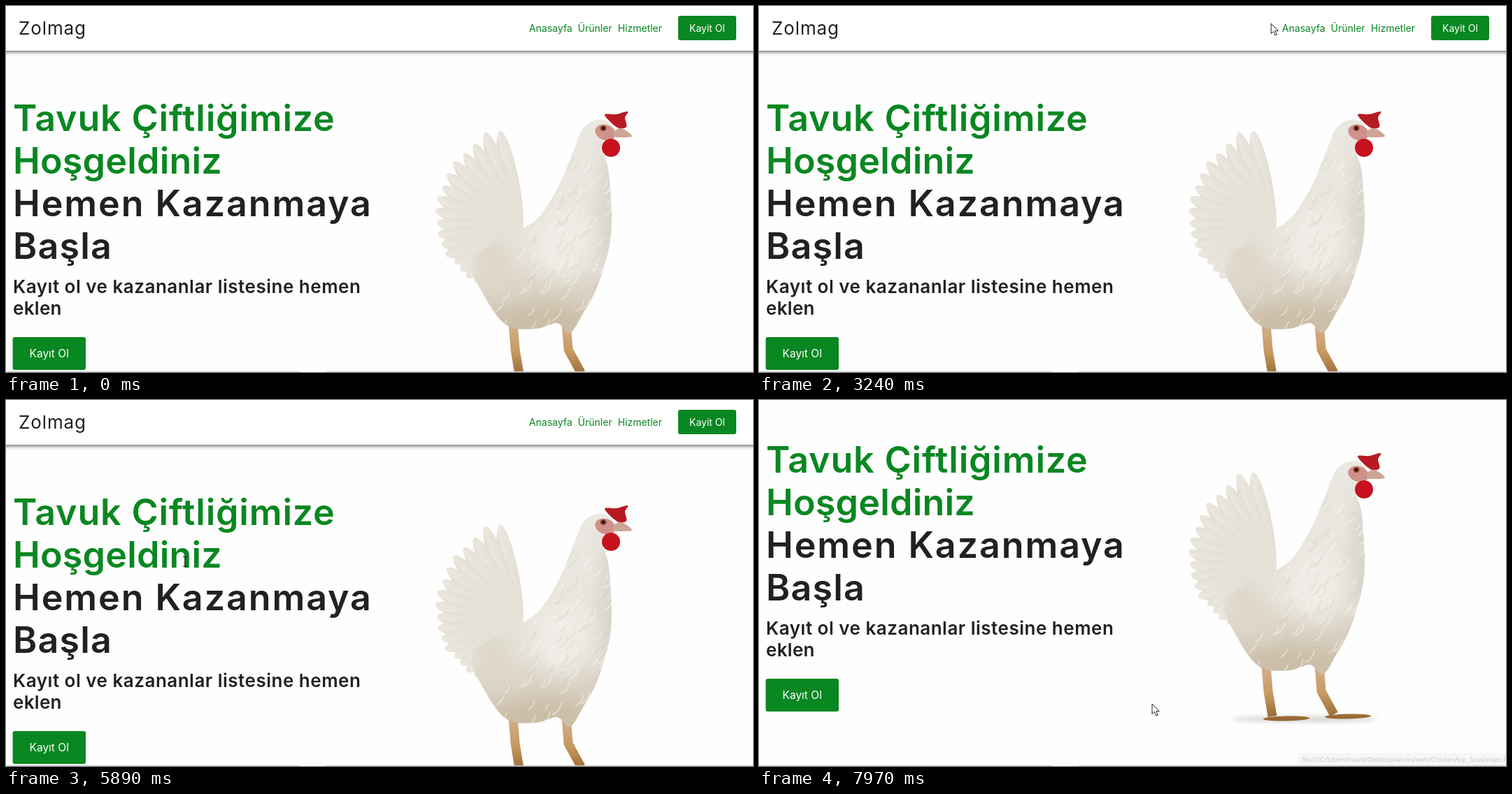
Recreate the animation shown at these times as an HTML page with a canvas. Size 1068 by 524 pixels, loop 8000 ms.

```html
<!DOCTYPE html>
<html lang="tr">
<head>
<meta charset="utf-8">
<title>Tavuk Çiftliği</title>
<style>
html, body { margin: 0; width: 100%; height: 100%; overflow: hidden; background: #fefefe; }
canvas { display: block; }
</style>
</head>
<body>
<canvas id="stage" width="1068" height="524"></canvas>
<script>
const W = 1068, H = 524, LOOP = 8000;
const ctx = document.getElementById('stage').getContext('2d');
const GREEN = [9, 135, 33], BROWN = [160, 82, 45], INK = '#212123';
const SANS = 'Inter, "Open Sans", sans-serif';
const URL_TEXT = 'file:///C:/Users/mavili/Desktop/works/web/ChickenApp_Scss/index.html#';

const mix = (a, b, p) => a + (b - a) * p;
const clamp = p => Math.min(1, Math.max(0, p));
const smooth = p => p * p * (3 - 2 * p);
const tint = p => `rgb(${GREEN.map((c, i) => Math.round(mix(c, BROWN[i], p)))})`;
const ramp = (t, at, time) => smooth(clamp((t - at) / time));
// 0 to 1 from time "on", back to 0 from time "off"
const pulse = (on, off, time = 360) => t => ramp(t, on, time) - ramp(t, off, time);

const logoHover = pulse(1550, 2550);
const headHover = pulse(4760, 5280);
const mainHover = pulse(6900, 7490);
const logoUrl = pulse(1640, 2700, 200);
const navUrl = pulse(3290, 5400, 200);
const mainUrl = pulse(6940, 7840, 200);

const nav = [
  { text: 'Hizmetler', hover: pulse(4240, 4570) },
  { text: 'Ürünler', hover: pulse(3690, 4190) },
  { text: 'Anasayfa', hover: pulse(3250, 3800) }
];

// Each trip of the pointer starts where the last one ended
const trips = [
  { from: 110, to: 840, x: 246, y: 14 },
  { from: 1040, to: 1900, x: 105, y: 34 },
  { from: 2430, to: 3180, x: 732, y: 25 },
  { from: 3240, to: 3920, x: 847, y: 37 },
  { from: 4050, to: 4740, x: 967, y: 28 },
  { from: 5270, to: 5890, x: 256, y: 231 },
  { from: 5890, to: 6850, x: 64, y: 480 },
  { from: 7480, to: 7970, x: 562, y: 435 }
];
function pointerAt(t) {
  let x = 1012, y = 518;
  for (const trip of trips) {
    const p = clamp((t - trip.from) / (trip.to - trip.from));
    x = mix(x, trip.x, p);
    y = mix(y, trip.y, p);
  }
  return [x, y];
}

const title = (text, row, gap) =>
  ({ text, y: 179 + 61 * row, size: 52, gap, color: row < 2 ? tint(0) : INK });
const lead = (text, row, gap) => ({ text, y: 411 + 31 * row, size: 26, gap, color: INK });
const lines = [
  title('Tavuk Çiftliğimize', 0, .8),
  title('Hoşgeldiniz', 1, .2),
  title('Hemen Kazanmaya', 2, 1.9),
  title('Başla', 3, 1.2),
  lead('Kayıt ol ve kazananlar listesine hemen', 0, .5),
  lead('eklen', 1, .3)
];

function setFont(size, weight = 400, gap = 0, family = SANS) {
  ctx.font = `${weight} ${size}px ${family}`;
  ctx.letterSpacing = gap + 'px';
}
function label(text, x, y, color) {
  ctx.fillStyle = color;
  ctx.fillText(text, x, y);
}

// Smooth closed curve through points given as "x,y x,y ..."
function blob(list) {
  const p = list.split(' ').map(s => s.split(',').map(Number)), n = p.length;
  const path = new Path2D();
  path.moveTo(...p[0]);
  for (let i = 0; i < n; i++) {
    const [a, b, c, d] = [n - 1, 0, 1, 2].map(k => p[(i + k) % n]);
    path.bezierCurveTo(b[0] + (c[0] - a[0]) / 6, b[1] + (c[1] - a[1]) / 6,
      c[0] - (d[0] - b[0]) / 6, c[1] - (d[1] - b[1]) / 6, ...c);
  }
  path.closePath();
  return path;
}

function makeHen() {
  const cv = document.createElement('canvas');
  cv.width = W;
  cv.height = 600;
  const g = cv.getContext('2d');
  let seed = 7;
  const rnd = () => (seed = seed * 16807 % 2147483647) / 2147483647;
  const fill = (shape, color) => { g.fillStyle = color; g.fill(shape); };
  const oval = (x, y, rx, ry, turn = 0) => {
    const path = new Path2D();
    path.ellipse(x, y, rx, ry, turn, 0, 7);
    return path;
  };
  const shade = (y0, y1, ...colors) => {
    const grad = g.createLinearGradient(0, y0, 0, y1);
    colors.forEach((c, i) => grad.addColorStop(i / (colors.length - 1), c));
    return grad;
  };
  const soft = (px, paint) => {
    g.filter = `blur(${px}px)`;
    paint();
    g.filter = 'none';
  };

  soft(3, () => fill(oval(780, 532, 104, 4), '#d3d3d0'));

  const skin = shade(455, 535, '#d3b08e', '#c79a63', '#94622f');
  const leg = (x, knee, foot, y) => {
    g.strokeStyle = skin;
    g.lineJoin = 'round';
    g.lineWidth = 13;
    g.beginPath();
    g.moveTo(x, 455);
    g.lineTo(knee, 492);
    g.lineTo(foot, y - 3);
    g.stroke();
    fill(oval(foot + 20, y, 33, 3.5, -.02), skin);
  };
  leg(725, 728, 734, 531);
  leg(801, 804, 822, 528);

  // Tail feathers fan out from the rump, shorter towards the bottom
  const count = 17;
  for (let i = 0; i < count; i++) {
    const p = i / (count - 1), len = mix(156, 92, p) + rnd() * 8 - 4;
    g.save();
    g.translate(735, 328);
    g.rotate(mix(-1.76, -3.95, p));
    const vane = g.createLinearGradient(0, -12, 0, 12);
    vane.addColorStop(0, '#d8d1c3');
    vane.addColorStop(.35, '#ebe7df');
    vane.addColorStop(1, '#e4dfd4');
    fill(oval(len / 2, 0, len / 2, 13), vane);
    g.restore();
  }

  const body = blob('845,163 826,174 813,203 790,258 762,302 731,323 700,338 666,368 ' +
    '685,417 716,457 757,462 788,454 806,468 825,440 846,400 865,328 862,240 853,204 869,186 862,167');
  fill(body, shade(165, 468, '#ebe8e2', '#e9e6df', '#e6e2d9', '#cabda7'));
  g.save();
  g.clip(body);
  soft(14, () => {
    fill(oval(700, 375, 26, 55, -.4), '#ddd6c9');
    fill(oval(765, 455, 70, 22), '#cbbda6');
    fill(oval(866, 300, 12, 110), '#d3cdc2');
    fill(oval(795, 340, 38, 50), '#efece6');
  });
  g.lineCap = 'round';
  g.lineWidth = 1.6;
  for (let i = 0; i < 170; i++) {
    const y = 205 + rnd() * 250, x = mix(790, 690, (y - 205) / 250) + rnd() * 150, s = 5 + rnd() * 9;
    g.strokeStyle = i % 2 ? '#cdc4b455' : '#faf8f488';
    g.beginPath();
    g.moveTo(x, y);
    g.quadraticCurveTo(x - s * .2, y + s, x - s, y + s * 1.3);
    g.stroke();
  }
  g.restore();

  fill(blob('856,156 872,155 889,151 885,160 887,173 874,174'), '#b81a22');
  fill(oval(857, 181, 15, 11, .3), '#cf9189');
  fill(oval(865, 203, 13, 13), '#c5121e');
  fill(blob('869,180 880,175 895,186 882,188 870,187'), '#cda595');
  fill(oval(854, 175, 4.5, 4), '#8f4424');
  fill(oval(854, 175, 2.4, 2.4), '#251510');
  return cv;
}
const hen = makeHen();

// The hover colour slides in from the left
function button(text, x, y, w, h, textX, size, p) {
  ctx.save();
  ctx.beginPath();
  ctx.roundRect(x, y, w, h, 3);
  ctx.fillStyle = tint(0);
  ctx.fill();
  ctx.clip();
  ctx.fillStyle = tint(1);
  ctx.fillRect(x, y, w * p, h);
  ctx.restore();
  setFont(size);
  label(text, textX, y + h / 2 + size * .36, '#fff');
}

function drawHeader(t) {
  ctx.save();
  ctx.shadowColor = 'rgba(0,0,0,.6)';
  ctx.shadowBlur = 5;
  ctx.shadowOffsetY = 2;
  ctx.fillStyle = '#fff';
  ctx.fillRect(-10, -10, W + 20, 74);
  ctx.restore();

  ctx.save();
  const s = 1 + .2 * logoHover(t);
  ctx.translate(67.5, 32);
  ctx.scale(s, s);
  setFont(26, 400, .9);
  label('Zolmag', -49.5, 9, INK);
  ctx.restore();

  let right = 938;
  for (const item of nav) {
    const p = item.hover(t);
    setFont(14 * (1 + .11 * p));
    right -= ctx.measureText(item.text).width;
    label(item.text, right, 37, tint(p));
    right -= 8;
  }
  button('Kayit Ol', 961, 14, 83, 35, 977, 14, headHover(t));
}

function drawStatus(x, w, textX, alpha, radii) {
  if (alpha <= 0) return;
  ctx.save();
  ctx.globalAlpha = alpha;
  ctx.beginPath();
  ctx.roundRect(x, 506, w, 17, radii);
  ctx.fillStyle = '#dee1e6';
  ctx.fill();
  ctx.strokeStyle = '#c9ccd1';
  ctx.lineWidth = .6;
  ctx.stroke();
  setFont(9.3, 400, 0, '"Open Sans", "Noto Sans", sans-serif');
  label(URL_TEXT, textX, 518, '#3f4246');
  ctx.restore();
}

const arrow = new Path2D('M0 0V14.5L3.4 11.4L5.8 17L8.2 16L5.8 10.6H10.3Z');
const hand = new Path2D('M-2 1.5Q0 -1 1.6 1.5V7Q6 6 9.7 10.4V14Q9 17 7.8 19.5H-.4Q-2 16 -5.2 12.4Q-6 10 -3.8 10L-2 11.6Z');
const knuckles = new Path2D('M1.6 7V10M4.6 7.6V10.4M7.4 8.6V10.8');
const beam = new Path2D('M-3 -7H3M0 -7V7M-3 7H3');

function drawPointer(t) {
  if (t < 110) return;
  const [x, y] = pointerAt(t);
  const inside = (l, top, w, h) => x >= l && x <= l + w && y >= top && y <= top + h;
  const onLink = inside(8, 12, 119, 40) || inside(738, 20, 200, 26) ||
    inside(961, 14, 83, 35) || inside(10, 474, 104, 47);
  const onText = lines.some(l => inside(10, l.y - l.size * .83, l.width, l.size * 1.17));
  ctx.save();
  ctx.translate(x, y);
  ctx.lineJoin = 'round';
  ctx.lineWidth = 1;
  ctx.strokeStyle = '#222';
  ctx.fillStyle = '#fff';
  if (onText) {
    ctx.stroke(beam);
  } else {
    const shape = onLink ? hand : arrow;
    ctx.fill(shape);
    ctx.stroke(shape);
    if (onLink) ctx.stroke(knuckles);
  }
  ctx.restore();
}

function draw(t) {
  ctx.fillStyle = '#fefefe';
  ctx.fillRect(0, 0, W, H);
  ctx.save();
  ctx.translate(0, -75 * ramp(t, 7850, 120));
  ctx.drawImage(hen, 0, 0);
  for (const l of lines) {
    setFont(l.size, 600, l.gap);
    l.width = ctx.measureText(l.text).width;
    label(l.text, 10, l.y, l.color);
  }
  button('Kayıt Ol', 9.6, 474, 104.4, 47, 33.5, 15.5, mainHover(t));
  drawHeader(t);
  ctx.restore();

  ctx.fillStyle = '#cfcfca';
  ctx.fillRect(0, 523, 420, 1);
  ctx.fillRect(457, 523, W - 457, 1);
  drawStatus(-4, 308, -3, logoUrl(t) + navUrl(t), [0, 4, 0, 0]);
  drawStatus(771, 300, 776, mainUrl(t), [4, 0, 0, 0]);
  drawPointer(t);
}

const start = performance.now();
function tick() {
  draw((performance.now() - start) % LOOP);
  requestAnimationFrame(tick);
}
tick();
</script>
</body>
</html>
```
